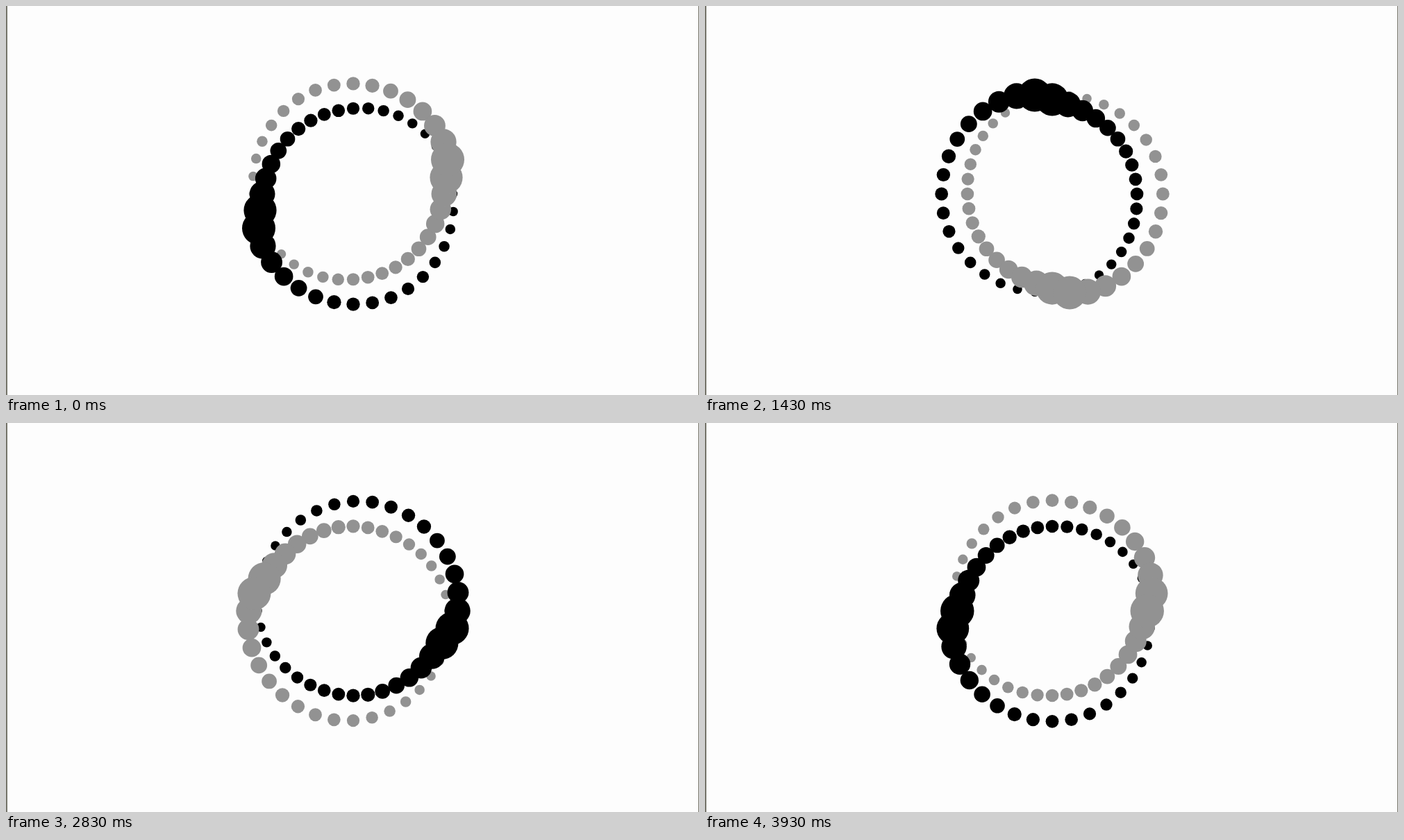
These frames come from a looping animation (998 by 561 pixels, 3.99 s). An HTML page with a canvas:

```html
<!DOCTYPE html>
<html lang="en">
<head>
<meta charset="utf-8">
<title>Twisting dot ring</title>
<style>
  html, body { margin: 0; width: 100%; height: 100%; overflow: hidden; background: #fdfdfd; }
  canvas { position: absolute; left: 0; top: 0; filter: blur(0.6px); }
  i { position: absolute; top: 0; width: 1.5px; height: 100vh; background: #77766c; }
</style>
</head>
<body>
<canvas id="stage" width="998" height="561"></canvas>
<i style="left:0"></i><i style="right:0"></i>
<script>
const ctx = document.getElementById('stage').getContext('2d');
const LOOP = 3990, STEP = 100 / 3, LAST = 118;
const CX = 500, CY = 271, COUNT = 36;
const DOT = 18.75, RING = DOT * 7.5;
const DEPTH = 2 / 3; // furthest travel towards the viewer / perspective distance
const COLORS = ['#000', '#929292'];

// [step, degrees] of the nearest point of the black strand; about 6 degrees a step
const TURN = [[0, 195.3], [29, 364.6], [43, 455.3], [61, 562.4], [85, 705.3], [104, 823.3], [118, 904.4]];

function turnAt(step) {
  let i = 1;
  while (step > TURN[i][0]) i++;
  const [a, from] = TURN[i - 1], [b, to] = TURN[i];
  return from + (to - from) * (step - a) / (b - a);
}

// cubic-bezier(.42, 0, 1, 1), solved for x by bisection
function easeIn(x) {
  let lo = 0, hi = 1;
  for (let i = 0; i < 24; i++) {
    const s = (lo + hi) / 2, r = 1 - s;
    if (1.26 * r * r * s + 3 * r * s * s + s * s * s < x) lo = s;
    else hi = s;
  }
  return 3 * lo * lo - 2 * lo * lo * lo;
}

// One dot on the twisted strand; phase 0 is nearest to the viewer
function makeDot(angle, phase, color) {
  const p = ((phase % 360) + 360) % 360;
  const fromSide = Math.abs((p % 180) - 90) / 90;
  const w = easeIn(fromSide);
  const z = (p < 90 || p > 270 ? 1 : -1) * w;
  const side = p < 180 ? 1 : -1;
  const scale = 1 / (1 - DEPTH * z);
  const r = RING + side * (1 - w) * DOT * scale;
  const a = angle * Math.PI / 180;
  return { x: CX + r * Math.cos(a), y: CY - r * Math.sin(a), z, size: DOT / 2 * scale, color };
}

function draw(time) {
  const step = Math.min(LAST, Math.floor((time + 5) / STEP));
  const turn = turnAt(step);
  const dots = [];
  for (let i = 0; i < COUNT; i++) {
    const angle = i * 360 / COUNT;
    COLORS.forEach((color, k) => dots.push(makeDot(angle, angle - turn + k * 180, color)));
  }
  dots.sort((a, b) => a.z - b.z);
  ctx.clearRect(0, 0, 998, 561);
  for (const d of dots) {
    ctx.fillStyle = d.color;
    ctx.beginPath();
    ctx.arc(d.x, d.y, d.size, 0, Math.PI * 2);
    ctx.fill();
  }
}

const start = performance.now();
function tick() {
  draw((performance.now() - start) % LOOP);
  requestAnimationFrame(tick);
}
tick();
</script>
</body>
</html>
```
